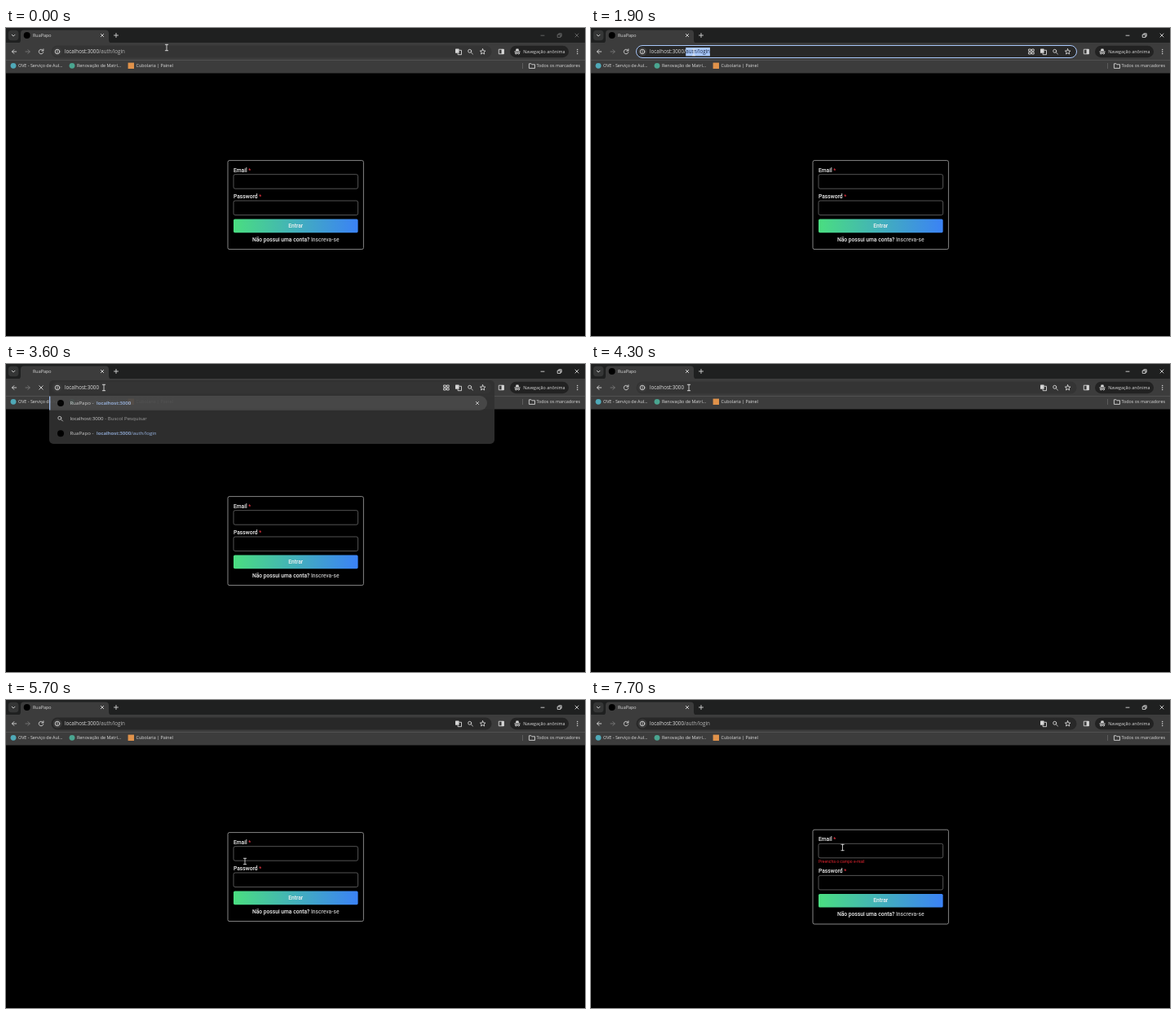
Recreate the animation shown at these times as an HTML page. Size 710 px wide and 378 px high, loop 8000 ms.

```html
<!DOCTYPE html>
<html lang="pt">
<head>
<meta charset="utf-8">
<title>Login</title>
<style>
  html, body { margin: 0; width: 100%; height: 100%; overflow: hidden; background: #000; }
  svg { display: block; width: 100vw; height: 100vh; }
  text { font: 5.4px "Open Sans", "Noto Sans", sans-serif; fill: #dcdcdc; white-space: pre; }
  .url { font-size: 6.23px; }
  .suggest { font-size: 6.1px; }
  .match { fill: #a8c7fa; font-weight: 600; }
  .link { fill: #a8c7fa; }
  .muted { fill: #aaa; }
  .mail { font-size: 5.6px; fill: #c8c8c8; }
  .page text { font: 500 6.7px Roboto, Arial, sans-serif; fill: #f2f2f2; }
  .page .star { fill: #e5323e; }
  .page .signup { fill: #bdbdbd; }
  .page .error { font-size: 5px; font-weight: 400; fill: #e0242f; }
  .icon { fill: none; stroke: #d6d6d6; stroke-width: .9; stroke-linecap: round; stroke-linejoin: round; }
  .solid { fill: #d6d6d6; stroke: none; }
  .field { fill: #000; stroke: #777; stroke-width: .7; }
</style>
</head>
<body>
<svg id="stage" viewBox="0 0 710 378" preserveAspectRatio="none"></svg>
<script>
const LOOP = 8000, STEP = 100;
const APP = 'RuaPapo', HOST = 'localhost:3000', ROUTE = '/auth/login';
const MAILS = ['marezulnoturno47@mail.test', 'prova@mail.test', 'montesombrado@mail.test',
  'florestadoverao@postal.test', 'prova2@mail.test', 'montesombrado52@mail.test'];

const rect = (x, y, w, h, rx, attrs = '') =>
  `<rect x="${x}" y="${y}" width="${w}" height="${h}" rx="${rx}" ${attrs}/>`;
const dot = (x, y, r, fill, attrs = '') => `<circle cx="${x}" cy="${y}" r="${r}" fill="${fill}" ${attrs}/>`;
const text = (x, y, value, cls = '', attrs = '') => `<text x="${x}" y="${y}" class="${cls}" ${attrs}>${value}</text>`;
const icon = (d, attrs = '') => `<path class="icon" d="${d}" ${attrs}/>`;
const cross = (x, y, r, attrs) =>
  icon(`M${x - r} ${y - r}l${2 * r} ${2 * r}m0 ${-2 * r}l${-2 * r} ${2 * r}`, attrs);
const lens = (x, y) => icon(`M${x + 1} ${y + 1}l2 2`) +
  `<circle class="icon" cx="${x - .7}" cy="${y - .7}" r="2"/>`;
const starPath = (x, y, r) => 'M' + Array.from({ length: 10 }, (_, i) => {
  const a = i * Math.PI / 5, k = i % 2 ? r * .45 : r;
  return `${(x + k * Math.sin(a)).toFixed(2)} ${(y - k * Math.cos(a)).toFixed(2)}`;
}).join('L') + 'Z';

const tabStrip = () => `
  ${rect(0, 0, 710, 19, 0, 'fill="#1f2020"')}
  ${rect(2.8, 2.8, 12.6, 12.4, 4, 'fill="#353636"')}
  ${icon('M7.2 8.2l1.9 1.9 1.9-1.9')}
  <path d="M14.5 18.5q3.5 0 3.5-4V6.500q0-4 4-4H122q4 0 4 4v8q0 4 3.500 4z" fill="#3c3c3c"/>
  ${dot(25.7, 9, 4, '#000', 'id="favicon"')}
  ${text(33, 11, APP)}
  ${cross(118, 9, 1.7)}
  ${icon('M132.500 9h5m-2.500-2.500v5')}
  <g id="controls">
    ${icon('M656 9.200h4')}
    ${icon('M676.600 8h3.400v3.400h-3.400zM677.800 8V6.800h3.400v3.400H680', 'stroke-width=".7"')}
    ${cross(700, 9, 2)}
  </g>`;

const toolbar = () => `
  ${rect(0, 18, 710, 37.5, 0, 'fill="#3c3c3c"')}
  ${rect(0, 39, 710, .8, 0, 'fill="#555"')}
  ${icon('M12.700 29H7.500m2.300-2.400L7.500 29l2.300 2.400')}
  ${icon('M24 29h5.200m-2.300-2.400l2.300 2.400-2.300 2.400', 'style="stroke:#777"')}
  ${icon('M45.500 27.600a2.800 2.800 0 1 0 .3 2.200M45.900 25.800v2.200h-2.200', 'id="reload"')}
  <g id="stop">${cross(43, 29, 2.2)}</g>
  ${icon('M604.700 26.200h5.600v5.600h-5.600z')}${rect(607.6, 26, 3, 6, 0, 'class="solid"')}
  ${rect(618, 21.8, 72, 14.4, 7.2, 'fill="#222"')}
  <path class="solid" d="M623.400 28.600h7.200v.8h-7.200zM624.900 28l.7-2.500h2.800l.7 2.500z"/>
  <circle class="icon" cx="625.4" cy="31" r="1"/><circle class="icon" cx="628.6" cy="31" r="1"/>
  ${text(634.3, 31, 'Navegação anônima')}
  ${[26.6, 29, 31.4].map(y => dot(700.7, y, .75, '#d6d6d6')).join('')}`;

const bookmarks = () => `
  ${dot(9, 46.3, 3.4, '#4fa9b8')}${text(15, 48.2, 'OVE - Serviço de Aul...')}
  ${dot(81, 46.3, 3.4, '#4aa590')}${text(87, 48.2, 'Renovação de Matrí...')}
  ${rect(149.6, 42.6, 7.4, 7.4, 0, 'fill="#e0924a"')}${text(159.5, 48.2, 'Cubolaria | Painel')}
  ${rect(633, 43, .8, 7, 0, 'fill="#666"')}
  ${icon('M641.800 43.800h2.300l.9 1h3.500v4.600h-6.700z')}
  ${text(704, 48.2, 'Todos os marcadores', '', 'text-anchor="end"')}`;

const suggestions = () => `
  <g id="suggestions">
    ${rect(53, 20, 546, 78, 5, 'fill="#313131"')}
    <path d="M53 39H581a9 9 0 0 1 0 18H53z" fill="#484848"/>
    ${rect(53, 39.5, 1.3, 17, .6, 'fill="#a8c7fa"')}
    ${dot(67, 48, 4, '#000')}${text(78.5, 50.2, APP + ' -', 'suggest')}${text(111, 50.2, HOST, 'suggest match')}
    ${cross(578, 48, 1.7)}
    ${lens(66.5, 67)}${text(78.5, 69, `${HOST}<tspan class="muted"> - Buscol Pesquisar</tspan>`, 'suggest')}
    ${dot(67, 85.3, 4, '#000')}${text(78.5, 87.4, APP + ' -', 'suggest')}
    ${text(111, 87.4, `${HOST}<tspan class="link" font-weight="400">${ROUTE}</tspan>`, 'suggest match')}
  </g>`;

const omnibox = () => `
  ${rect(55.5, 21.5, 540, 15, 7.5, 'id="pill"')}
  ${dot(63, 29, 5.6, '#3a3a3a')}
  <circle class="icon" cx="63" cy="29" r="2.8"/>${icon('M63 28.900v1.300M63 27.600v.05')}
  <rect id="selection" y="24" height="10.4" fill="#a8c7fa"/>
  ${text(72, 31.4, '<tspan></tspan><tspan></tspan><tspan fill="#1c2a44"></tspan>', 'url', 'id="url"')}
  <g id="qr">${[0, 1, 2, 3].map(i =>
    rect(537 + i % 2 * 3.9, 26 + (i >> 1) * 3.7, 2.3, 2.3, 0, 'class="icon"')).join('')}</g>
  ${rect(551, 25.6, 4.6, 5.2, .6, 'class="solid"')}
  ${icon('M556.200 27.300h2.300v5.400h-4.400v-1.400')}
  ${lens(569.4, 29)}
  ${icon(starPath(584.6, 29.2, 3.5))}`;

const label = (y, value) => text(279, y, `${value} <tspan class="star">*</tspan>`);
const field = y => rect(279, y, 152.6, 17.5, 2, 'class="field"');

const page = () => `
  <g id="card" class="page">
    <rect id="frame" x="272" width="166.4" rx="2" fill="#000" stroke="#a8a8a8" stroke-width=".8"/>
    <g id="upper">${label(176.6, 'Email')}${field(179.7)}</g>
    ${text(279, 200.3, 'Preencha o campo e-mail', 'error', 'id="error"')}
    <g id="lower">
      ${label(209, 'Password')}${field(212)}
      ${rect(279, 234.5, 152.6, 16.7, 1.6, 'fill="url(#action)"')}
      ${text(355.2, 245, 'Entrar', '', 'text-anchor="middle"')}
      ${text(355.2, 261.6, 'Não possui uma conta? <tspan class="signup">Inscreva-se</tspan>', '', 'text-anchor="middle"')}
    </g>
  </g>
  <g id="autofill">
    ${rect(325, 201.5, 100, 103.5, 2, 'fill="#202020"')}
    ${MAILS.map((mail, i) => text(331, 213.7 + i * 16.55, mail, 'mail')).join('')}
  </g>`;

const pointer = () => `
  <g id="pointer">
    <path id="arrow" d="M0 0V7.600L1.700 6.100 2.900 8.800 4.100 8.300 2.900 5.700H5.100z" fill="#fff" stroke="#000" stroke-width=".3"/>
    ${icon('M-1.700-3.700H1.700M0-3.700V3.700M-1.700 3.700H1.700', 'id="ibeam" style="stroke:#eee;stroke-width:.8"')}
  </g>`;

document.getElementById('stage').innerHTML = `
  <defs><linearGradient id="action"><stop stop-color="#4ade80"/><stop offset="1" stop-color="#3b82f6"/></linearGradient></defs>
  ${rect(0, 0, 710, 378, 0, 'fill="#000"')}
  ${tabStrip()}${toolbar()}${bookmarks()}${page()}${suggestions()}${omnibox()}${pointer()}`;

const el = id => document.getElementById(id);
const show = (id, on) => el(id).style.display = on ? '' : 'none';
const within = (t, from, to) => t >= from && t < to;

// Each key is [time, ...values]; values ease between neighbouring keys.
function sample(keys, t) {
  const i = keys.findIndex(k => k[0] > t);
  if (i < 0) return keys[keys.length - 1].slice(1);
  if (i === 0) return keys[0].slice(1);
  const a = keys[i - 1], b = keys[i];
  const u = (t - a[0]) / (b[0] - a[0]), e = u * u * (3 - 2 * u);
  return a.slice(1).map((v, n) => v + (b[n + 1] - v) * e);
}

const POINTER = [[0, 197, 24], [200, 192.5, 30], [1600, 192.5, 30], [1900, 126, 30], [2300, 120, 29],
  [4800, 120, 29], [5300, 236.5, 207.5], [5400, 236.5, 207.5], [5700, 293, 198], [6100, 293, 198],
  [6300, 244, 171], [6800, 244, 171], [7100, 308.5, 176], [7600, 308.5, 176], [7700, 308.5, 181]];
const SUGGESTIONS = [[2700, 0], [2900, 1], [3500, 1], [3600, .92], [3700, 0]];
const AUTOFILL = [[5800, 0], [6000, 1], [6400, 1], [6500, .87], [6700, 0]];

function selectedLength(t) {
  if (within(t, 500, 1100)) return 25;
  if (within(t, 1500, 1700)) return 5;
  return within(t, 1700, 2800) ? 10 : 0;
}

function drawUrl(t, focused) {
  const path = within(t, 2800, 4500) ? '' : ROUTE;
  const full = HOST + path, start = full.length - selectedLength(t);
  const [host, rest, picked] = el('url').children;
  host.textContent = full.slice(0, Math.min(start, HOST.length));
  rest.textContent = full.slice(HOST.length, Math.max(start, HOST.length));
  rest.setAttribute('fill', focused ? '#dcdcdc' : '#b4b4b4');
  picked.textContent = full.slice(start);
  const before = start ? el('url').getSubStringLength(0, start) : 0;
  el('selection').setAttribute('x', 72 + before);
  el('selection').setAttribute('width', el('url').getComputedTextLength() - before);
  show('selection', start < full.length);
}

function drawPage(t) {
  const invalid = t >= 6500, shift = invalid ? 3.4 : 0;
  show('card', !within(t, 3800, 4500));
  show('error', invalid);
  el('frame').setAttribute('y', 162.6 - shift);
  el('frame').setAttribute('height', 109 + 2 * shift);
  el('upper').setAttribute('transform', `translate(0 ${-shift})`);
  el('lower').setAttribute('transform', `translate(0 ${shift})`);
  el('autofill').setAttribute('opacity', sample(AUTOFILL, t)[0]);
}

function drawPointer(t) {
  const [x, y] = sample(POINTER, t);
  const overText = (y > 20 && y < 37) || (x > 279 && x < 432 && y > 175 && y < 199);
  el('pointer').setAttribute('transform', `translate(${x} ${y})`);
  show('ibeam', overText);
  show('arrow', !overText);
}

function render(t) {
  const focused = within(t, 400, 2800), loading = within(t, 3500, 4200);
  const hovered = t < 400 || within(t, 3500, 5000);
  el('controls').setAttribute('opacity', t < 400 ? .4 : 1);
  el('pill').setAttribute('fill', hovered ? '#343434' : '#282828');
  el('pill').setAttribute('stroke', focused ? '#a8c7fa' : 'none');
  show('qr', within(t, 400, 3900));
  show('favicon', !loading);
  show('reload', !loading);
  show('stop', loading);
  el('suggestions').setAttribute('opacity', sample(SUGGESTIONS, t)[0]);
  drawUrl(t, focused);
  drawPage(t);
  drawPointer(t);
}

const origin = performance.now();
function tick() {
  const t = (performance.now() - origin) % LOOP;
  render(Math.floor(t / STEP) * STEP);
  requestAnimationFrame(tick);
}
tick();
</script>
</body>
</html>
```
